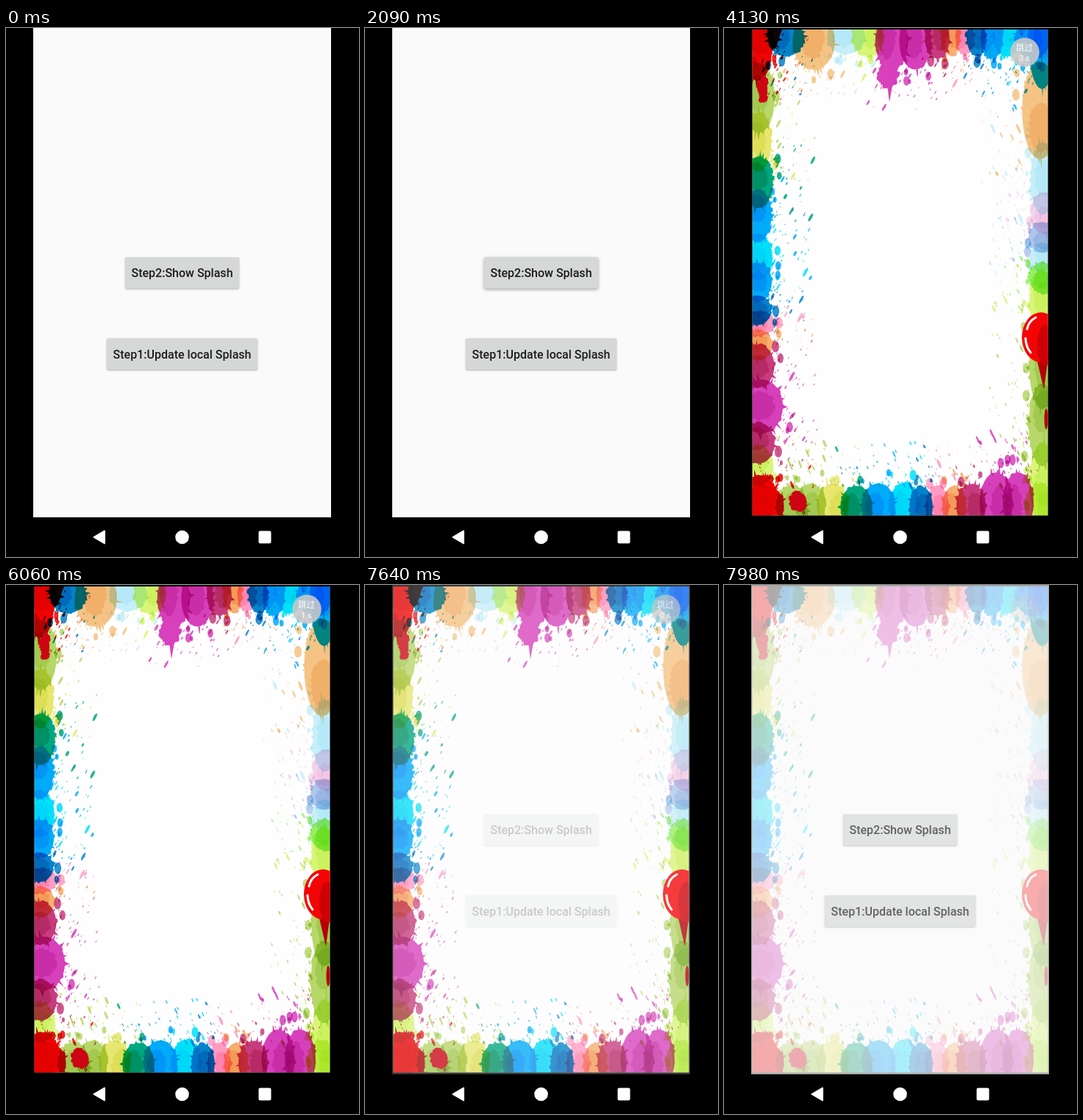
An HTML page with a canvas that plays this animation: 480x720 px, repeating every 8000 ms.

```html
<!DOCTYPE html>
<html lang="en">
<head>
<meta charset="utf-8">
<title>Splash screen demo</title>
<style>
  html, body { margin: 0; width: 480px; height: 720px; overflow: hidden; background: #000; }
  canvas { display: block; }
</style>
</head>
<body>
<canvas id="stage" width="480" height="720"></canvas>
<script>
const LOOP = 8000, STEP = 112.5;
const TICKS = [3110, 4130, 5150, 6060, 7080];
const APP = [37, 0, 405, 666];
const COLORS = {
  red: '#f40404', crimson: '#c83c80', magenta: '#d840bc', pink: '#ff9cc4', blush: '#f8d4ec',
  peach: '#f6c484', orange: '#f8b070', yellow: '#e8e870', lime: '#daf678', olive: '#b8d868',
  green: '#98f068', teal: '#00a880', ice: '#c8f0fa', haze: '#b0c8ec', cyan: '#00e2fa',
  blue: '#00acfa', navy: '#0484cc',
};
const ctx = document.getElementById('stage').getContext('2d');
const art = document.createElement('canvas');
art.width = 480;
art.height = 720;
const g = art.getContext('2d');

let seed = 11;
const rand = () => (seed = seed * 16807 % 2147483647) / 2147483647;
const between = (a, b) => a + (b - a) * rand();
const clamp = v => Math.max(0, Math.min(1, v));
const held = (t, start) => Math.floor((t - start) / STEP) * STEP;

function dot(x, y, rx, ry, angle = 0) {
  g.beginPath();
  g.ellipse(x, y, rx, ry, angle, 0, 7);
  g.fill();
}

// An ellipse with bumps and thin spikes, filled as one shape
function blob(x, y, rx, ry) {
  const at = (a, k) => [x + Math.cos(a) * rx * k, y + Math.sin(a) * ry * k];
  g.beginPath();
  g.ellipse(x, y, rx, ry, 0, 0, Math.PI * 2);
  for (let i = 0; i < 14; i++) {
    const a = rand() * Math.PI * 2, half = between(0.04, 0.12);
    g.moveTo(...at(a - half, 0.95));
    g.lineTo(...at(a, between(1.05, 1.3)));
    g.lineTo(...at(a + half, 0.95));
    const [bx, by] = at(a + 0.5, 0.93), size = between(2, 4);
    g.moveTo(bx + size, by);
    g.arc(bx, by, size, 0, Math.PI * 2);
  }
  g.fill();
}

function polygon(...points) {
  g.beginPath();
  points.forEach(p => g.lineTo(...p));
  g.fill();
}

// Stains along one side of the picture; runs are [color, position along the side].
// Each stain reaches into its neighbours and throws drops inward.
function edge(side, depth, runs) {
  const upright = side === 'left' || side === 'right';
  const place = {
    top: (u, d) => [u, 2 + d],
    right: (u, d) => [440.5 - d, u],
    bottom: (u, d) => [u, 663.5 - d],
    left: (u, d) => [38.5 + d, u],
  }[side];
  const lean = side === 'top' || side === 'left' ? 0.5 : -0.4;
  const lump = (u, d, along, inward, shape = blob) =>
    shape(...place(u, d), ...(upright ? [inward, along] : [along, inward]));

  runs.forEach(([name, u], i) => {
    const before = runs[i - 1]?.[1] ?? u * 2 - runs[1][1];
    const after = runs[i + 1]?.[1] ?? u * 2 - before;
    const half = (after - before) * 0.35;
    const reach = depth * (name === 'magenta' || name === 'peach' ? 1.3 : between(0.8, 1));
    g.fillStyle = COLORS[name];
    lump(u, reach * 0.3, half, reach * 0.7);
    g.globalAlpha = 0.4;
    lump(u + between(-0.4, 0.4) * half, reach * 0.25, half * 0.5, reach * 0.45);
    g.globalAlpha = 0.85;
    for (let n = 0; n < 2; n++) {
      const size = between(2, 5);
      dot(...place(u + between(-1, 1) * half, reach * between(1.05, 1.35)), size, size * 1.6);
    }
    for (let n = 0; n < 9 + half / 2; n++) {
      const size = between(0.4, 1) + rand() ** 6 * 2;
      dot(...place(u + between(-1.5, 1.5) * half, reach + 55 * rand() ** 1.8),
        size * 0.7, size * between(1, 3), lean);
    }
    g.globalAlpha = 1;
  });
}

function drawRedDrop() {
  g.fillStyle = '#b40008';
  polygon([424, 445], [442, 440], [435, 492]);
  dot(438, 532, 2.5, 14);
  g.fillStyle = COLORS.red;
  dot(431, 421, 26, 34);
  g.fillStyle = '#cc0006';
  dot(437, 432, 11, 28);
  g.strokeStyle = '#fff';
  g.lineCap = 'round';
  g.lineWidth = 3;
  g.beginPath();
  g.ellipse(431, 421, 21, 28, 0, 2.3, 3.1);
  g.moveTo(412, 410);
  g.quadraticCurveTo(414, 399, 424, 394);
  g.stroke();
}

function drawArt() {
  g.fillStyle = '#000';
  g.fillRect(...APP);
  g.beginPath();
  g.rect(38.5, 2, 402, 661.5);
  g.clip();
  g.fillStyle = '#fefefe';
  g.fillRect(...APP);

  g.globalCompositeOperation = 'multiply';
  edge('top', 42, [['red', 52], ['navy', 84], ['peach', 122], ['ice', 166], ['lime', 196],
    ['magenta', 228], ['magenta', 260], ['crimson', 290], ['orange', 308], ['pink', 327],
    ['navy', 343], ['blue', 364], ['cyan', 386], ['blue', 420]]);
  edge('right', 27, [['blue', 15], ['peach', 112], ['ice', 205], ['blush', 252], ['haze', 285],
    ['ice', 312], ['green', 340], ['lime', 372], ['olive', 460], ['olive', 540], ['lime', 620]]);
  edge('bottom', 45, [['red', 57], ['olive', 92], ['olive', 118], ['yellow', 148], ['teal', 180],
    ['blue', 210], ['cyan', 245], ['navy', 268], ['pink', 290], ['orange', 313],
    ['crimson', 336], ['magenta', 370], ['magenta', 400], ['lime', 430]]);
  edge('left', 32, [['red', 20], ['olive', 95], ['yellow', 155], ['teal', 210], ['blue', 255],
    ['cyan', 312], ['blue', 345], ['navy', 384], ['pink', 402], ['orange', 432],
    ['crimson', 460], ['magenta', 515], ['crimson', 565], ['lime', 595], ['red', 640]]);
  g.globalCompositeOperation = 'source-over';

  g.fillStyle = COLORS.magenta;
  blob(223, 63, 13, 18);
  polygon([222, 78], [225, 101], [229, 77]);
  g.fillStyle = '#cc0414';
  blob(53, 83, 6, 17);
  blob(101, 644, 11, 12);
  g.fillStyle = '#100404';
  polygon([66, 2], [79, 2], [71, 23]);
  drawRedDrop();
}

function text(label, x, y, font, color) {
  ctx.font = font;
  ctx.fillStyle = color;
  ctx.textAlign = 'center';
  ctx.fillText(label, x, y);
}

function button(label, x, y, w, h, press) {
  ctx.save();
  ctx.shadowColor = `rgba(0,0,0,${0.3 + press * 0.1})`;
  ctx.shadowBlur = 2.5 + press * 4;
  ctx.shadowOffsetY = 1 + press;
  ctx.fillStyle = '#d6d7d7';
  ctx.beginPath();
  ctx.roundRect(x, y, w, h, 2);
  ctx.fill();
  ctx.restore();
  text(label, x + w / 2, y + 27, '500 16px Roboto, sans-serif', '#1c1c1c');
}

function drawMain(t) {
  ctx.fillStyle = '#fafafa';
  ctx.fillRect(...APP);
  const press1 = t >= 500 && t < 1300 ? Math.sin(Math.PI * (held(t, 500) + STEP) / 900) : 0;
  const press2 = t >= 1980 && t < 2430 ? clamp((held(t, 1980) + STEP) / 200) : 0;
  button('Step2:Show Splash', 162, 312, 155, 42.5, press2);
  button('Step1:Update local Splash', 137, 422.5, 205, 42.5, press1);
}

function drawSplash(t) {
  ctx.drawImage(art, 0, 0);
  ctx.fillStyle = 'rgba(200,200,200,.9)';
  ctx.beginPath();
  ctx.arc(409, 33, 19.8, 0, 7);
  ctx.fill();
  const left = TICKS.filter(tick => t < tick).length;
  text('跳过', 408.5, 31, '11.5px "Noto Sans CJK SC", "Noto Sans CJK", sans-serif', '#fff');
  text(left + ' s', 408.5, 44.5, '11px Roboto, sans-serif', '#fff');
}

function drawNav() {
  ctx.fillStyle = '#000';
  ctx.fillRect(0, 666, 480, 54);
  ctx.fillStyle = ctx.strokeStyle = '#fff';
  ctx.lineJoin = 'round';
  ctx.lineWidth = 2;
  ctx.beginPath();
  ctx.moveTo(119.5, 693);
  ctx.lineTo(134, 684.5);
  ctx.lineTo(134, 701.5);
  ctx.closePath();
  ctx.fill();
  ctx.stroke();
  ctx.beginPath();
  ctx.arc(239.5, 693, 9.3, 0, 7);
  ctx.roundRect(343.5, 684.5, 17, 17, 2);
  ctx.fill();
}

function layer(draw, t, alpha = 1, dy = 0) {
  ctx.save();
  ctx.globalAlpha = alpha;
  ctx.beginPath();
  ctx.rect(...APP);
  ctx.clip();
  ctx.translate(0, dy);
  draw(t);
  ctx.restore();
}

function render(t) {
  ctx.fillStyle = '#000';
  ctx.fillRect(0, 0, 480, 720);
  if (t < 2430) {
    layer(drawMain, t);
    const age = held(t, 1980) - 130;
    if (age > 0) layer(drawSplash, t, clamp(age / 200), 53 * (1 - clamp(age / 350)) ** 5);
  } else if (t < 7300) {
    layer(drawSplash, t);
  } else {
    const progress = (held(t, 7300) + 10) / 1100;
    layer(drawMain, t);
    layer(drawSplash, t, (1 + Math.cos(Math.PI * progress)) / 2);
  }
  drawNav();
}

drawArt();
const frame = () => {
  render(performance.now() % LOOP);
  requestAnimationFrame(frame);
};
frame();
</script>
</body>
</html>
```
